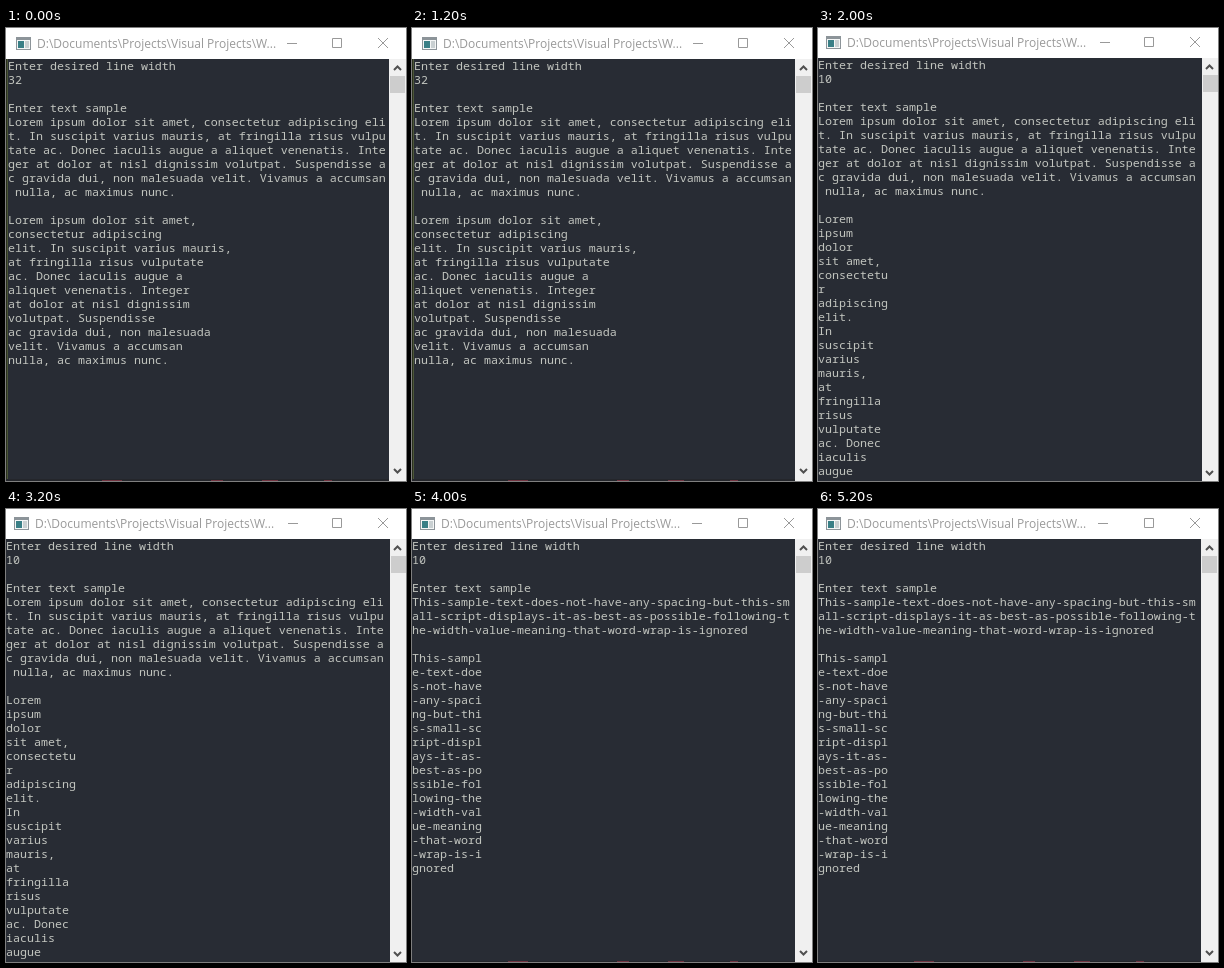
These frames come from a looping animation (400x453 px, 6000 ms). An HTML page:

```html
<!DOCTYPE html>
<html lang="en">
<head>
<meta charset="utf-8">
<title>Line wrap console</title>
<style>
  html, body { margin: 0; width: 100%; height: 100%; overflow: hidden; background: #fff; }
  svg { display: block; }
  .title { font: 12px "Open Sans", "Noto Sans", sans-serif; fill: #999; }
  .console { font: 11.667px "Noto Sans Mono", monospace; fill: #c3c6c0; white-space: pre; }
  .line { fill: none; stroke: #999; }
  .arrow { fill: none; stroke: #505050; stroke-width: 2; }
</style>
</head>
<body>
<svg id="stage" width="400" height="453" viewBox="0 0 400 453"></svg>
<script>
const stage = document.getElementById('stage');
const SCENE_MS = 2000, COLUMNS = 54, LINE = 14;

const lorem = 'Lorem ipsum dolor sit amet, consectetur adipiscing elit. In suscipit varius mauris, ' +
  'at fringilla risus vulputate ac. Donec iaculis augue a aliquet venenatis. Integer at dolor at ' +
  'nisl dignissim volutpat. Suspendisse ac gravida dui, non malesuada velit. Vivamus a accumsan ' +
  'nulla, ac maximus nunc.';
const unspaced = 'This-sample-text-does-not-have-any-spacing-but-this-small-script-displays-it-as-' +
  'best-as-possible-following-the-width-value-meaning-that-word-wrap-is-ignored';

const chunk = (text, size) => text.match(new RegExp(`.{1,${size}}`, 'g'));

const scenes = [
  { x: 2, y: 31, bar: 383, min: 286, down: 443, floor: 451, width: 32, sample: lorem,
    output: ('Lorem ipsum dolor sit amet,|consectetur adipiscing|elit. In suscipit varius mauris,|' +
      'at fringilla risus vulputate|ac. Donec iaculis augue a|aliquet venenatis. Integer|' +
      'at dolor at nisl dignissim|volutpat. Suspendisse|ac gravida dui, non malesuada|' +
      'velit. Vivamus a accumsan|nulla, ac maximus nunc.').split('|') },
  { x: 0, y: 30, bar: 384, min: 287, down: 445, floor: 453, width: 10, sample: lorem,
    output: ('Lorem|ipsum|dolor|sit amet,|consectetu|r|adipiscing|elit.|In|suscipit|varius|mauris,|' +
      'at|fringilla|risus|vulputate|ac. Donec|iaculis|augue').split('|') },
  { x: 0, y: 30, bar: 383, min: 285, down: 444, floor: 452, width: 10, sample: unspaced,
    output: chunk(unspaced, 10) }
];

const rect = (x, y, w, h, fill) => `<rect x="${x}" y="${y}" width="${w}" height="${h}" fill="${fill}"/>`;
const path = (d, kind) => `<path class="${kind}" d="${d}"/>`;

function titleBar({ x, y, min }) {
  const mid = y - 16;
  return rect(0, 0, 400, y, '#fff') +
    rect(x + 8, mid - 6, 15, 13, '#8c9499') + rect(x + 9, mid - 3, 13, 9, '#f4f6f6') +
    rect(x + 10, mid - 2, 6, 7, '#397f86') + rect(x + 17, mid - 2, 4, 7, '#c9d0d2') +
    `<text class="title" x="${x + 29}" y="${y - 11}">D:\\Documents\\Projects\\Visual Projects\\W...</text>` +
    path(`M${min - 5} ${mid + .5}h10M326.5 ${mid - 4.5}h9v9h-9zM372 ${mid - 5}l10 10m0-10l-10 10`, 'line');
}

function scrollBar({ y, bar, down }) {
  return rect(bar, y, 400 - bar, 453 - y, '#f0f0f0') +
    rect(bar + 1, y + 17, 15, 17, '#cdcdcd') +
    path(`M388 ${y + 11}l3.5-3.5 3.5 3.5M388 ${down - 2}l3.5 3.5 3.5-3.5`, 'arrow');
}

function consoleText({ x, y, width, sample, output }) {
  const lines = ['Enter desired line width', width, '', 'Enter text sample',
    ...chunk(sample, COLUMNS), '', ...output];
  return lines.map((text, i) =>
    `<text class="console" x="${x}" y="${y + 11 + i * LINE}">${text}</text>`).join('');
}

function draw(scene) {
  const { x, y, floor } = scene;
  let edges = '';
  if (x) edges += rect(0, y, 1, 422, '#2b3020') + rect(1, y, 1, 422, '#4b5638');
  if (floor < 453) {
    edges += rect(0, floor, 383, 453 - floor, '#24262b');
    for (const [left, w] of [[96, 20], [205, 12], [256, 16], [318, 8]])
      edges += rect(left, 452, w, 1, '#713340');
  }
  stage.innerHTML = rect(0, y, 400, 453 - y, '#282c34') + edges +
    titleBar(scene) + scrollBar(scene) + consoleText(scene);
}

let shown = -1;
function tick() {
  const current = Math.floor(performance.now() / SCENE_MS) % scenes.length;
  if (current !== shown) draw(scenes[shown = current]);
  requestAnimationFrame(tick);
}
tick();
</script>
</body>
</html>
```
